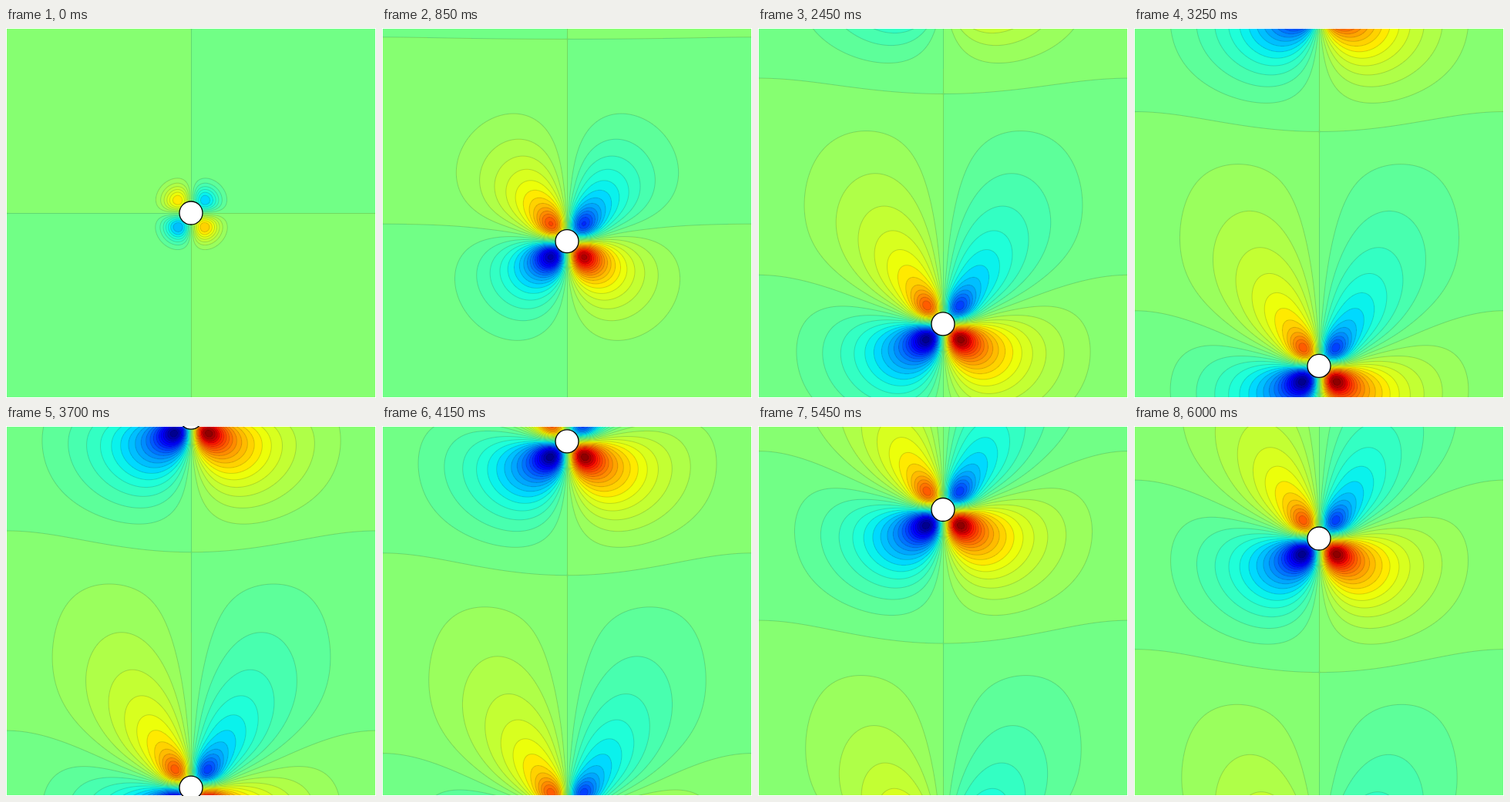
An HTML page with a canvas that plays this animation: 480 by 480 pixels, repeating every 6050 ms.

```html
<!DOCTYPE html>
<html lang="en">
<head>
<meta charset="utf-8">
<title>Vorticity around a swimmer</title>
<style>
html, body { margin: 0; height: 100%; overflow: hidden; background: #fff; }
canvas { display: block; }
</style>
</head>
<body>
<canvas id="stage" width="480" height="480"></canvas>
<script>
const L = 480, C = 240, COLS = C + 1;
const STEP = 50, FRAMES = 121;
const SPEED = 3.41, RAMP = 6.8;      // px per step, steps to reach full speed
const NU = 180, HEAD_START = 0.45;   // diffusivity, emission time before step 0
const LEVELS = 20, NODES = 22;
// Emitters that travel with the body: [strength, core radius, steps to build up]
const EMITTERS = [[24000, 15.5, 0], [40000, 40, 10], [55000, 70, 10]];

const ctx = document.getElementById('stage').getContext('2d');
const img = ctx.createImageData(L, L);
const field = new Float64Array(COLS * L);
const across = new Float64Array(COLS);

const clamp = (v, lo, hi) => Math.max(lo, Math.min(hi, v));
const wrap = s => s - L * Math.round(s / L);
const path = n => n <= 0 ? C : C + SPEED * (n - RAMP * (1 - Math.exp(-n / RAMP)));

function jet(v) {
  return [
    Math.min((v - 0.35) / 0.31, 1 - (v - 0.89) / 0.22),
    Math.min((v - 0.125) / 0.25, (0.91 - v) / 0.27),
    Math.min(0.5 + v / 0.22, (0.65 - v) / 0.31)
  ].map(c => 255 * clamp(c, 0, 1));
}
const bands = Array.from({ length: 2 * LEVELS }, (_, i) => jet((i + 0.5) / (2 * LEVELS)));

// Slope of a Gaussian of variance q, repeated with the period of the box
function kernel(x, q) {
  let sum = 0;
  for (let i = -2; i <= 2; i++) {
    const p = x + i * L;
    sum += p * Math.exp(-p * p / (2 * q));
  }
  return sum / (q * Math.sqrt(q));
}

// Vorticity shed along the path, each part spreading since it was shed
function solve(n) {
  field.fill(0);
  const age = n + HEAD_START, dv = Math.log(1 + 2 * age) / NODES;
  for (let k = 0; k < NODES; k++) {
    const e = Math.exp((k + 0.5) * dv), tau = 0.5 * (e - 1);
    const y0 = path(n - tau);
    for (const [strength, core, rise] of EMITTERS) {
      const q = core * core + 2 * NU * tau;
      const growth = rise ? 1 - Math.exp((tau - age) / rise) : 1;
      const amount = NU * strength * growth * 0.5 * e * dv;
      for (let d = 0; d < COLS; d++) across[d] = amount * kernel(d, q);
      for (let y = 0; y < L; y++) {
        const g = kernel(wrap(y - y0), q), row = y * COLS;
        for (let d = 0; d < COLS; d++) field[row + d] += g * across[d];
      }
    }
  }
  // The flow is a little stronger ahead of the body than behind it
  const body = path(n);
  for (let y = 0; y < L; y++) {
    const s = wrap(y - body);
    for (let d = 0; d < COLS; d++) {
      const r = Math.hypot(d, s);
      field[y * COLS + d] *= 1 + 0.17 * s / (r + 10) * Math.exp(-r * r / 6400);
    }
  }
}

function paint() {
  const px = img.data;
  px.fill(255);
  for (let y = 1; y < L - 1; y++) {
    for (let x = 1; x < L - 1; x++) {
      const k = y * COLS + Math.abs(x - C);
      const h = field[k], w = x < C ? -h : h;
      const color = bands[clamp(Math.floor(w) + LEVELS, 0, 2 * LEVELS - 1)];
      const level = Math.round(w);
      let shade = 1;
      if (Math.abs(level) < LEVELS) {
        const slope = Math.hypot(field[k + 1] - h, field[k + COLS] - h) + 1e-99;
        shade -= 0.15 * Math.max(0, 1 - Math.abs(w - level) / slope);
      }
      const o = 4 * (y * L + x);
      for (let c = 0; c < 3; c++) px[o + c] = color[c] * shade;
    }
  }
  ctx.putImageData(img, 0, 0);
}

function drawBody(y) {
  ctx.beginPath();
  ctx.arc(C, y, 15, 0, 2 * Math.PI);
  ctx.fillStyle = '#fff';
  ctx.fill();
  ctx.lineWidth = 1.3;
  ctx.strokeStyle = '#000';
  ctx.stroke();
}

let shown = -1;
function tick() {
  const n = Math.floor(performance.now() / STEP) % FRAMES;
  if (n !== shown) {
    shown = n;
    solve(n);
    paint();
    const y = path(n) % L;
    for (const shift of [-L, 0, L]) drawBody(y + shift);
  }
  requestAnimationFrame(tick);
}
tick();
</script>
</body>
</html>
```
